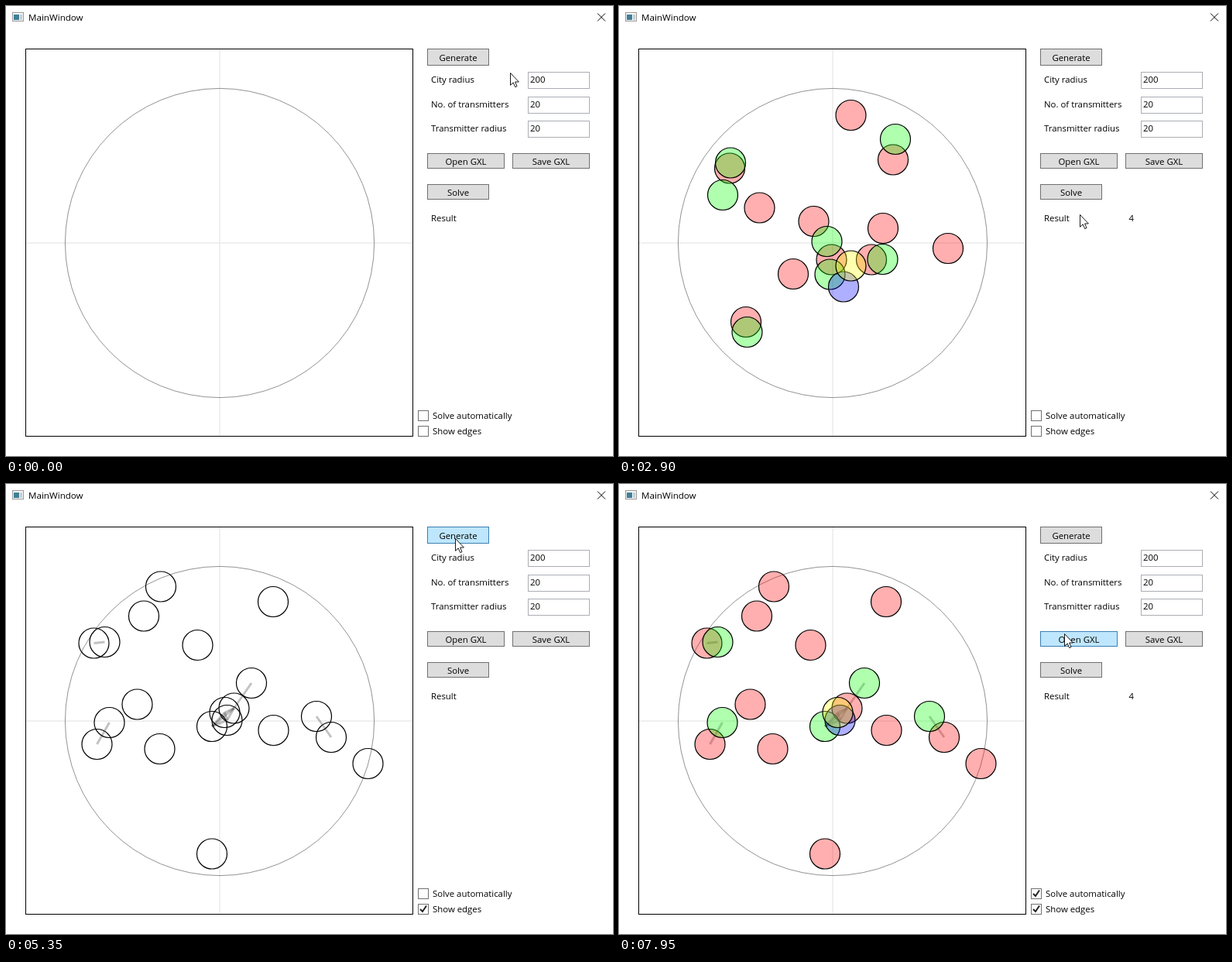
An HTML page that plays this animation: 784x581 px, repeating every 8 s.

```html
<!DOCTYPE html>
<html lang="en">
<head>
<meta charset="utf-8">
<title>MainWindow</title>
<style>
  html, body { margin: 0; width: 100%; height: 100%; overflow: hidden; background: #fff; }
  svg { display: block; }
  text { font: 11.4px "Open Sans", "Noto Sans", sans-serif; fill: #000; }
  .mid { text-anchor: middle; }
  .button { fill: #ddd; stroke: #707070; }
  .button.hover { fill: #bee6fd; stroke: #3c7fb1; }
  .button.pressed { fill: #c4e5f6; stroke: #2c628b; }
  .box { fill: #fff; stroke: #707070; }
  .box.hover { fill: #f3f9ff; stroke: #5593ff; }
  .box.pressed { fill: #d9ecff; stroke: #3c77dd; }
  .field { fill: #fff; stroke: #abadb3; }
  .tick { fill: none; stroke: #212121; stroke-width: 2; }
  .edge { stroke: #000; stroke-opacity: .24; stroke-width: 3; }
  .node { stroke: #000; stroke-width: 1.2; fill-opacity: .314; }
</style>
</head>
<body>
<svg id="stage" width="784" height="581" viewBox="0 0 784 581"></svg>
<script>
const LOOP = 8000, STEP = 50, REACH = 40;
const stage = document.getElementById('stage');

function add(tag, attrs, parent = stage) {
  const el = document.createElementNS('http://www.w3.org/2000/svg', tag);
  for (const k in attrs) el.setAttribute(k, attrs[k]);
  parent.append(el);
  return el;
}
function label(x, y, str, attrs = {}) {
  const el = add('text', { x, y, ...attrs });
  el.textContent = str;
  return el;
}
function rect(x, y, width, height, attrs) {
  return add('rect', { x: x + .5, y: y + .5, width: width - 1, height: height - 1, ...attrs });
}
const show = (el, on) => el.style.display = on ? '' : 'none';

// Title bar
rect(8, 8, 15, 12, { fill: '#f6f6f6', stroke: '#9a9a9a' });
add('rect', { x: 10, y: 11, width: 7, height: 7, fill: '#3f7f96' });
add('rect', { x: 18, y: 11, width: 3, height: 7, fill: '#c4cdd2' });
label(29, 19, 'MainWindow', { style: 'font-size:11.6px' });
add('path', { d: 'M764 9.5l10 10m0-10l-10 10', stroke: '#000', fill: 'none' });

// Plot area
rect(25, 55, 501, 501, { fill: '#fff', stroke: '#000' });
add('path', { d: 'M276 56V555M26 306H525', stroke: '#e0e0e0' });
add('circle', { cx: 276, cy: 306, r: 199.6, fill: 'none', stroke: '#777', 'stroke-width': .8 });

// Transmitters as "x,y,colour", colours in the order they are assigned
const paint = { r: '#f00', g: '#0f0', b: '#00f', y: '#ff0' };
const cities = [
  `299.5,141,r 357,172,g 354,198.5,r 144,202.5,g 143,209.5,r 134,244,g 181.5,260.5,r
   251.5,278,r 268.5,304,g 341,287,r 425,313,r 274.5,327.5,r 299.5,335.5,y 326,327.5,r
   340.5,327,g 272.5,346.5,g 290,362.5,b 225,346,r 164,408,r 165.5,421,g`,
  `200,132.5,r 345,152,r 178,170.5,r 113.5,205.5,r 127.5,204,g 247.5,208,r 169.5,284.5,r
   133.5,308,g 117.5,336,r 198.5,342,r 317,257,g 294.5,289.5,r 282.5,295,y 285.5,305,b
   266,313,g 345.5,318,r 401,300,g 420,327,r 467.5,361,r 266,477.5,r`
].map(makeCity);

function makeCity(spec) {
  const root = add('g', {}), edges = add('g', {}, root);
  const points = spec.trim().split(/\s+/).map(s => {
    const [x, y, c] = s.split(',');
    return { x: +x, y: +y, c };
  }).sort((a, b) => 'rgby'.indexOf(a.c) - 'rgby'.indexOf(b.c));
  points.forEach((p, i) => points.slice(i + 1).forEach(q => {
    if (Math.hypot(p.x - q.x, p.y - q.y) < REACH)
      add('line', { class: 'edge', x1: p.x, y1: p.y, x2: q.x, y2: q.y }, edges);
  }));
  const nodes = points.map(p => ({
    el: add('circle', { class: 'node', cx: p.x, cy: p.y, r: 19.5 }, root),
    colour: paint[p.c]
  }));
  return { root, edges, nodes };
}

// Controls
const targets = [];
function button(x, y, w, h, str) {
  const el = rect(x, y, w, h, { class: 'button' });
  label(x + w / 2, y + h / 2 + 5, str, { class: 'mid' });
  targets.push({ el, kind: 'button', x, y, w, h });
}
function field(y, name, value) {
  label(549, y + 14, name);
  rect(674, y, 80, 22, { class: 'field' });
  label(677, y + 14, value);
}
function checkbox(y, str) {
  const el = rect(532, y, 14, 14, { class: 'box' });
  label(551, y + 11, str);
  targets.push({ el, kind: 'box', x: 532, y: y - 1, w: 121, h: 16 });
  return add('path', { class: 'tick', d: `M535 ${y + 7}l3 3 5-7.5` });
}
button(544, 55, 80, 22, 'Generate');
field(85, 'City radius', 200);
field(117, 'No. of transmitters', 20);
field(148, 'Transmitter radius', 20);
button(544, 190, 100, 20, 'Open GXL');
button(654, 190, 100, 20, 'Save GXL');
button(544, 230, 80, 20, 'Solve');
label(549, 278, 'Result');
const result = label(658.5, 278, '4');
const autoTick = checkbox(522, 'Solve automatically');
const edgeTick = checkbox(542, 'Show edges');

const pointer = add('path', {
  d: 'M.5.5V16.3L4.2 12.9 6.7 18.6 9 17.6 6.6 12H11.4Z',
  fill: '#fff', stroke: '#000', 'stroke-width': .9
});

// Pointer stops: time, x, y, easing of the way there
const ease = {
  in: u => u * u,
  out: u => 1 - (1 - u) ** 2,
  both: u => u * u * (3 - 2 * u),
  line: u => u
};
const path = [
  [0, 651, 86], [250, 651, 86], [800, 587, 68, 'both'],
  [1450, 587, 68], [1650, 606, 190, 'in'], [1850, 597, 238, 'out'],
  [2850, 597, 238], [2900, 595, 269], [3550, 540, 546, 'out'],
  [4150, 540, 546], [4200, 538, 530], [4700, 582, 72, 'both'],
  [5300, 582, 72], [5350, 580, 70], [5700, 580, 245, 'both'],
  [6600, 580, 245], [7250, 537, 526, 'both'],
  [7700, 537, 526], [7950, 575, 193, 'both'], [LOOP, 575, 193]
];
function pointerAt(t) {
  const i = Math.max(1, path.findIndex(p => p[0] >= t));
  const [t0, x0, y0] = path[i - 1], [t1, x1, y1, kind = 'line'] = path[i];
  const u = ease[kind]((t - t0) / (t1 - t0));
  return [Math.round(x0 + (x1 - x0) * u), Math.round(y0 + (y1 - y0) * u)];
}

const presses = [[900, 1000], [2150, 2250], [4800, 4900], [5800, 5900], [7350, 7450]];
const between = (t, a, b) => t >= a && t < b;

function render(t) {
  const [px, py] = pointerAt(t);
  pointer.setAttribute('transform', `translate(${px} ${py})`);

  const down = presses.some(([a, b]) => between(t, a, b));
  for (const { el, kind, x, y, w, h } of targets) {
    const over = between(px, x, x + w) && between(py, y, y + h);
    el.setAttribute('class', kind + (over ? down ? ' pressed' : ' hover' : ''));
  }

  const solved = between(t, 2200, 4850) || t >= 5850;
  const current = t < 950 ? -1 : t < 4850 ? 0 : 1;
  cities.forEach((city, i) => {
    show(city.root, i === current);
    show(city.edges, t >= 3750);
    for (const n of city.nodes) n.el.style.fill = solved ? n.colour : 'none';
  });
  show(result, solved);
  show(edgeTick, t >= 3750);
  show(autoTick, t >= 7400);
}

const start = performance.now();
function tick() {
  const t = (performance.now() - start) % LOOP;
  render(Math.floor(t / STEP) * STEP);
  requestAnimationFrame(tick);
}
tick();
</script>
</body>
</html>
```
